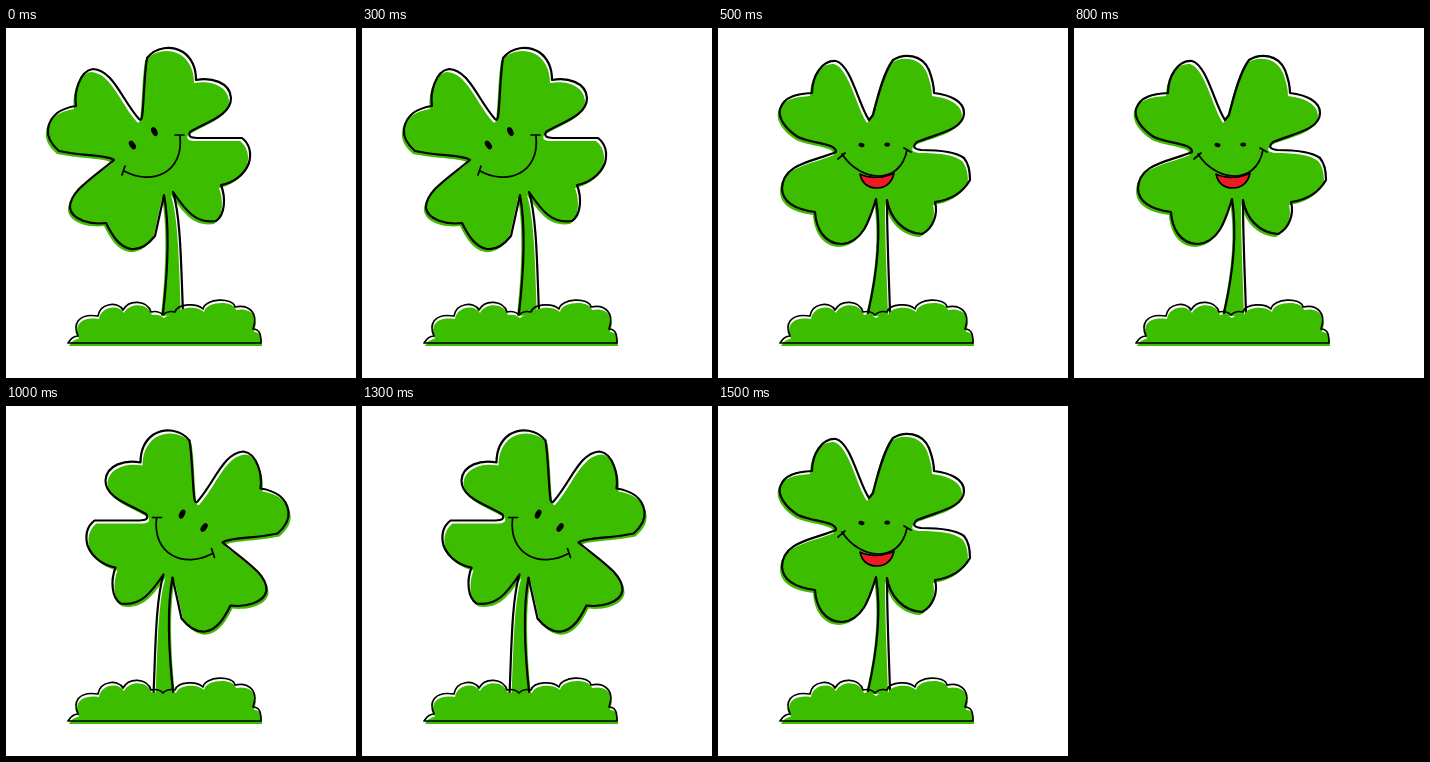
Recreate the animation shown at these times as an HTML page. Size 350x350 px, loop 2 s.

```html
<!DOCTYPE html>
<html lang="en">
<head>
<meta charset="utf-8">
<title>Swaying clover</title>
<style>
  html, body { margin: 0; width: 100%; height: 100%; overflow: hidden; background: #fff; }
  svg { display: block; width: 100vw; height: 100vh; }
  .fill { fill: #3dbd00; }
  .line { fill: none; stroke: #000; stroke-width: 2.2; stroke-linecap: round; stroke-linejoin: round; }
  .thin { stroke-width: 1.7; }
  .pose { visibility: hidden; animation: 2s step-end infinite; }
  .left { animation-name: left; }
  .front { animation-name: front; }
  .right { animation-name: right; }
  @keyframes left { 0% { visibility: visible; } 25%, 100% { visibility: hidden; } }
  @keyframes front { 0%, 50% { visibility: hidden; } 25%, 75% { visibility: visible; } }
  @keyframes right { 0%, 75%, 100% { visibility: hidden; } 50% { visibility: visible; } }
</style>
</head>
<body>
<svg viewBox="0 0 350 350">
  <defs>
    <path id="tilted" d="M157 285C161 250 164 200 158 167L149 208
      C141 218 133 222 125 221C113 219 106 207 100 195
      C85 197 66 192 64 180C63 164 86 150 108 132
      C103 127 76 128 53 123C45 116 41 109 42 101C44 87 56 80 70 78
      C68 65 73 43 87 41C107 42 116 72 133 91
      Q135 93 136 89C138 76 138 48 141 30C150 19 165 17 177 24C187 31 190 42 190 52
      C205 49 224 54 225 70C225 88 200 94 184 104
      C181 110 188 110 194 110L236 110C245 117 245 127 243 135C238 148 226 155 215 157
      C220 170 219 187 210 193C190 196 180 183 167 164
      C175 190 175 240 177 284"/>
    <path id="upright" d="M150 285C158 250 164 210 158 171
      C152 190 146 214 124 216C106 216 98 200 97 184
      C82 182 65 177 64 161C64 135 98 133 118 124
      C118 115 95 116 80 109C66 100 60 89 62 81C66 68 80 66 94 65
      C94 48 104 32 118 33C133 37 141 78 151 92
      L155 87C159 72 165 45 175 32C186 25 204 26 211 42C214 50 216 58 216 65
      C232 67 246 73 246 85C246 101 222 105 199 114
      C194 119 196 121 203 122C225 122 238 124 246 130C251 136 252 143 252 152
      C244 166 232 172 217 174
      C220 185 216 200 204 206C185 205 172 190 169 172
      C169 210 171 250 172 285"/>
    <path id="bush" d="M62 315C65 310 68 308 72 308
      C67 297 71 285 92 288C94 275 112 273 117 282C123 271 141 272 145 284
      C149 283 154 284 157 287C160 284 165 283 169 284
      C172 275 191 275 197 281C199 270 227 269 229 279
      C243 276 253 285 247 301C254 301 255 307 255 315Z"/>
    <g id="lean">
      <use href="#tilted" class="fill" x="-2" y="3"/>
      <use href="#tilted" class="line"/>
      <ellipse cx="126.4" cy="117" rx="2.8" ry="4.8" transform="rotate(-34 126.4 117)"/>
      <ellipse cx="148.4" cy="103.6" rx="2.8" ry="4.8" transform="rotate(-26 148.4 103.6)"/>
      <path class="line thin" d="M118 143C146 158 178 145 174 108M119 138L116 147M169 107L178 107"/>
    </g>
  </defs>

  <g class="pose left"><use href="#lean"/></g>

  <g class="pose front">
    <use href="#upright" class="fill" x="-2" y="3"/>
    <use href="#upright" class="line"/>
    <ellipse cx="143.5" cy="117" rx="3" ry="2" transform="rotate(15 143.5 117)"/>
    <ellipse cx="169.2" cy="116.6" rx="2.8" ry="2"/>
    <path class="line thin" d="M124 126C142 154 182 158 189 122M120 131L127 125M186 120L193 124"/>
    <path class="line thin" style="fill:#ed1c24" d="M142 146C152 151 167 150 176 145C174 156 166 160 159 160C150 160 144 155 142 146Z"/>
  </g>

  <g class="pose right"><use href="#lean" transform="translate(324.5 4.5) scale(-1 1)"/></g>

  <use href="#bush" class="fill" x="1" y="3"/>
  <use href="#bush" class="line thin"/>
</svg>
</body>
</html>
```
